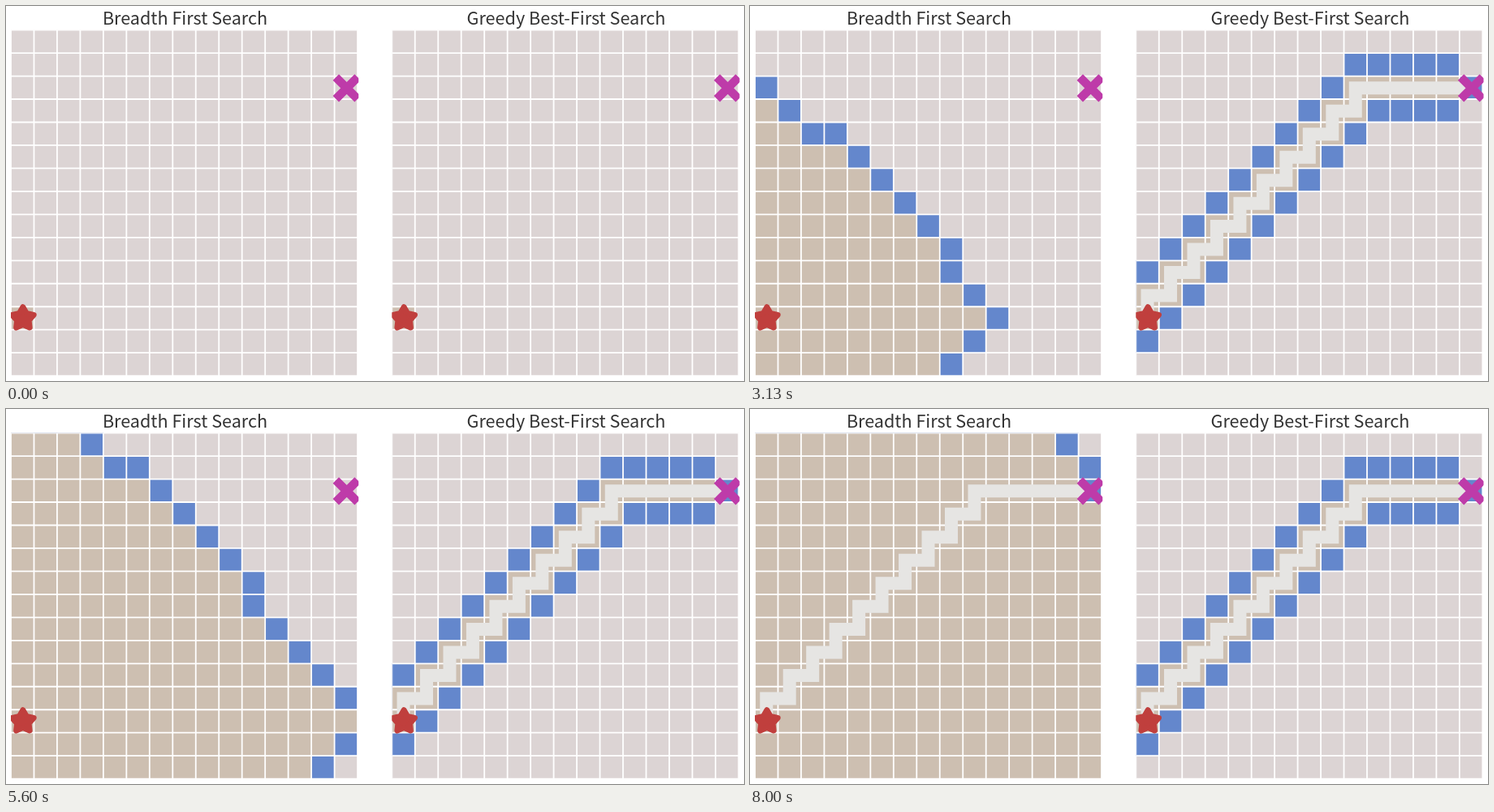
An HTML page with a canvas that plays this animation: 909x463 px, repeating every 8070 ms.

```html
<!DOCTYPE html>
<html lang="en">
<head>
<meta charset="utf-8">
<title>Breadth First Search and Greedy Best-First Search</title>
<style>
html, body { margin: 0; width: 909px; height: 463px; overflow: hidden; background: #fff; }
canvas { position: absolute; left: 0; top: 0; }
h2 {
  position: absolute; top: 0; margin: 0; width: 428px; text-align: center; white-space: nowrap;
  font: 400 21.6px/27px "Noto Sans CJK SC", "Noto Sans CJK JP", "Noto Sans CJK", "Open Sans", sans-serif;
  color: #333;
}
</style>
</head>
<body>
<canvas id="stage" width="909" height="463"></canvas>
<h2 style="left:6.5px">Breadth First Search</h2>
<h2 style="left:476px">Greedy Best-First Search</h2>
<script>
const ctx = document.getElementById('stage').getContext('2d');
const N = 15, P = 28.47, TOP = 29.6, LEFT = [6, 475.3];
const LOOP = 8070, TICK = 200 / 3;
const START = [0, 12], GOAL = [14, 2];
const COLOR = {
  empty: '#dcd4d4', seen: '#cdbfb1', edge: '#6487cc', line: '#fff',
  path: '#e6e5e3', star: '#c03f3d', cross: '#be3ba9'
};
// [tick, number of cells expanded]
const PACE = [[13, 0], [30, 37], [39, 61], [47, 77], [68, 113], [78, 140], [79, 140],
              [84, 149], [106, 192], [120, 222]];

const id = ([x, y]) => y * N + x;
const mid = v => (v + 0.5) * P;

// The order of directions flips on a checkerboard, which gives stepped paths.
function neighbors([x, y]) {
  const dirs = [[1, 0], [-1, 0], [0, 1], [0, -1]];
  if ((x + y) % 2 === 0) dirs.reverse();
  return dirs.map(([dx, dy]) => [x + dx, y + dy])
    .filter(([a, b]) => a >= 0 && b >= 0 && a < N && b < N);
}

function search() {
  const order = [START], from = { [id(START)]: null };
  for (let i = 0; i < order.length; i++) {
    for (const next of neighbors(order[i])) {
      if (id(next) in from) continue;
      from[id(next)] = order[i];
      order.push(next);
    }
  }
  const path = [];
  for (let c = GOAL; c; c = from[id(c)]) path.unshift(c);
  const end = order.findIndex(c => id(c) === id(GOAL));
  return { visits: order.slice(0, end), path };
}

const { visits, path } = search();

function expanded(tick) {
  if (tick <= PACE[0][0]) return 0;
  const i = PACE.findIndex(p => tick <= p[0]);
  const [t0, n0] = PACE[i - 1], [t1, n1] = PACE[i];
  return Math.floor(n0 + (n1 - n0) * (tick - t0) / (t1 - t0) + 1e-6);
}

function cell([x, y], color) {
  ctx.fillStyle = color;
  ctx.fillRect(x * P, y * P, P, P);
}

function drawGrid() {
  ctx.strokeStyle = COLOR.line;
  ctx.lineWidth = 1.8;
  ctx.beginPath();
  for (let i = 0; i <= N; i++) {
    ctx.moveTo(i * P, 0); ctx.lineTo(i * P, N * P);
    ctx.moveTo(0, i * P); ctx.lineTo(N * P, i * P);
  }
  ctx.stroke();
}

function drawPath() {
  ctx.strokeStyle = COLOR.path;
  ctx.lineWidth = 16;
  ctx.lineJoin = 'miter';
  ctx.beginPath();
  for (const [x, y] of path) ctx.lineTo(mid(x), mid(y) + 0.5);
  ctx.stroke();
}

function drawStar() {
  const cx = mid(START[0]) + 0.6, cy = mid(START[1]) + 0.2;
  ctx.fillStyle = ctx.strokeStyle = COLOR.star;
  ctx.lineWidth = 7;
  ctx.lineJoin = 'round';
  ctx.beginPath();
  for (let i = 0; i < 10; i++) {
    const r = i % 2 ? 7.6 : 14, a = i * Math.PI / 5;
    ctx.lineTo(cx + r * Math.sin(a), cy - r * Math.cos(a));
  }
  ctx.closePath();
  ctx.fill();
  ctx.stroke();
}

function drawCross() {
  const cx = mid(GOAL[0]) + 0.9, cy = mid(GOAL[1]) + 0.6, r = 13.4;
  ctx.strokeStyle = COLOR.cross;
  ctx.lineWidth = 10.5;
  ctx.beginPath();
  ctx.moveTo(cx - r, cy - r); ctx.lineTo(cx + r, cy + r);
  ctx.moveTo(cx + r, cy - r); ctx.lineTo(cx - r, cy + r);
  ctx.stroke();
}

function drawMap(left, order, count) {
  const seen = order.slice(0, count);
  ctx.save();
  ctx.translate(left, TOP);
  ctx.beginPath();
  ctx.rect(0, 0, N * P + 1.2, N * P + 1.2);
  ctx.clip();
  ctx.fillStyle = COLOR.empty;
  ctx.fillRect(0, 0, N * P, N * P);
  for (const c of seen) for (const n of neighbors(c)) cell(n, COLOR.edge);
  cell(START, COLOR.seen);
  for (const c of seen) cell(c, COLOR.seen);
  drawGrid();
  if (count > order.length) drawPath();
  drawStar();
  drawCross();
  ctx.restore();
}

function frame() {
  const t = performance.now() % LOOP;
  const count = expanded(Math.min(120, Math.floor((t + 3.4) / TICK)));
  ctx.clearRect(0, 0, 909, 463);
  drawMap(LEFT[0], visits, count);
  drawMap(LEFT[1], path.slice(0, -1), count);
  requestAnimationFrame(frame);
}
frame();
</script>
</body>
</html>
```
